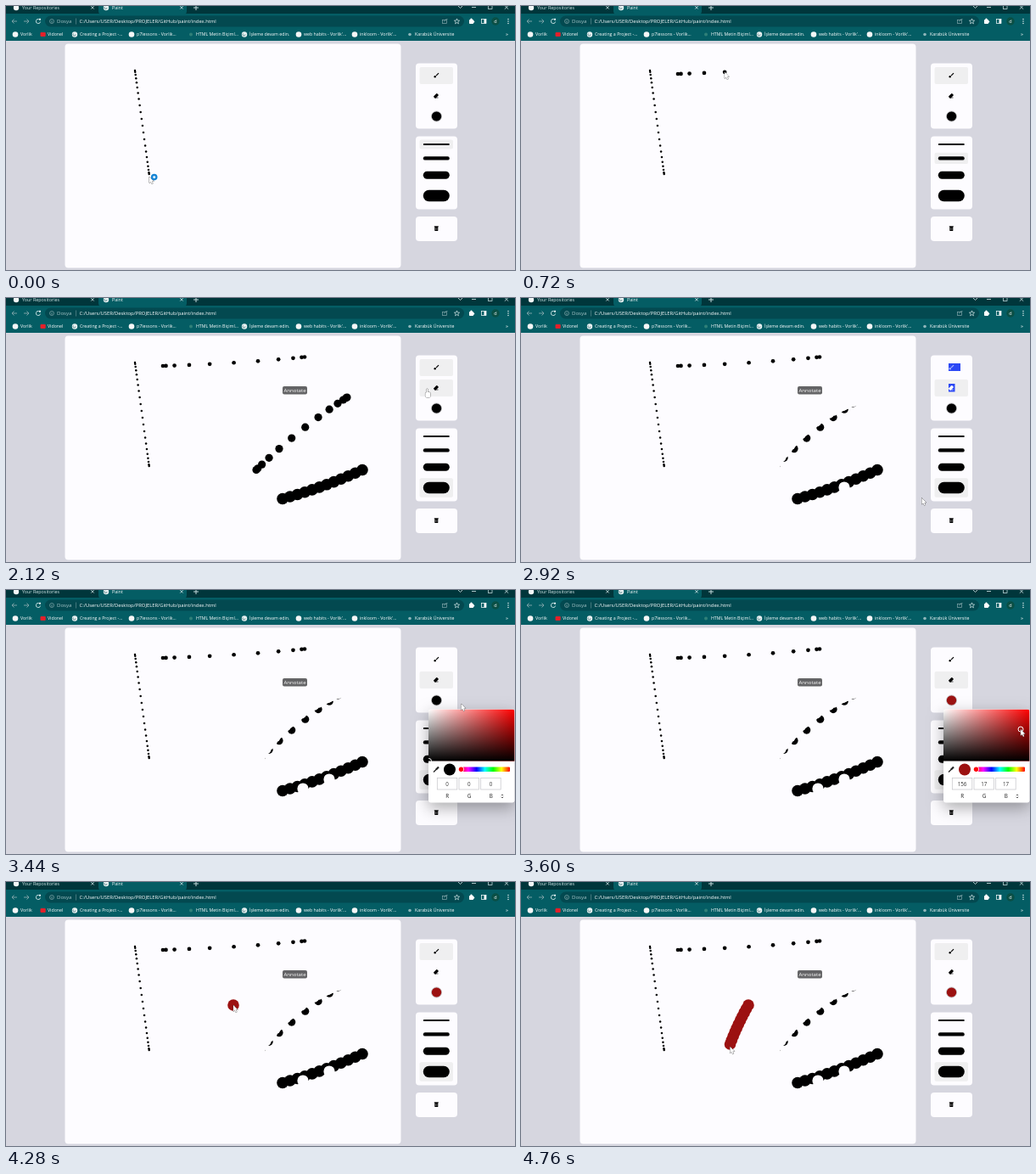
Recreate the animation shown at these times as an HTML page with a canvas. Size 600 px wide and 311 px high, loop 4800 ms.

```html
<!DOCTYPE html>
<html lang="tr">
<head>
<meta charset="utf-8">
<title>Paint</title>
<style>
html, body { margin: 0; width: 100%; height: 100%; overflow: hidden; background: #d6d6df; }
canvas { display: block; width: 100vw; height: 100vh; }
</style>
</head>
<body>
<canvas id="stage" width="600" height="311"></canvas>
<script>
const ctx = document.getElementById('stage').getContext('2d');
const LOOP = 4800, STEP = 40;
const PAPER = '#fdfcff', HOVER = '#efeff0', PALE = '#d9eaeb', DIM = '#86a9ad', RED = '#9c1111';
const FONT = '"Open Sans", "Noto Sans", sans-serif';

// ---------- drawing helpers ----------
function box(x, y, w, h, color, r = 0) {
  ctx.fillStyle = color;
  ctx.beginPath();
  ctx.roundRect(x, y, w, h, r);
  ctx.fill();
}
function frame(x, y, w, h, color, width = 0.7) {
  ctx.strokeStyle = color;
  ctx.lineWidth = width;
  ctx.strokeRect(x, y, w, h);
}
function disc(x, y, r, color) {
  ctx.fillStyle = color;
  ctx.beginPath();
  ctx.arc(x, y, r, 0, Math.PI * 2);
  ctx.fill();
}
function ring(x, y, r, color, width = 1, from = 0, to = Math.PI * 2) {
  ctx.strokeStyle = color;
  ctx.lineWidth = width;
  ctx.beginPath();
  ctx.arc(x, y, r, from, to);
  ctx.stroke();
}
function line(color, width, ...p) {
  ctx.strokeStyle = color;
  ctx.lineWidth = width;
  ctx.beginPath();
  for (let i = 0; i < p.length; i += 2) ctx.lineTo(p[i], p[i + 1]);
  ctx.stroke();
}
function label(str, x, y, size, color, align = 'left') {
  ctx.font = `${size}px ${FONT}`;
  ctx.textAlign = align;
  ctx.fillStyle = color;
  ctx.fillText(str, x, y);
}
// Open angle with its tip at (x, y), pointing along the given angle.
function chevron(x, y, angle, size, color, width = 0.8) {
  ctx.save();
  ctx.translate(x, y);
  ctx.rotate(angle);
  line(color, width, -size, -size, 0, 0, -size, size);
  ctx.restore();
}
function cross(x, y, r) {
  line(PALE, 0.8, x - r, y - r, x + r, y + r);
  line(PALE, 0.8, x + r, y - r, x - r, y + r);
}
function globe(x, y) {
  disc(x, y, 3.2, '#e8f1f2');
  ring(x - 0.5, y, 1.5, '#3f7278', 0.8, 0, 4);
}

// ---------- layout ----------
const BUTTON = { x: 487.5, w: 39.5 };
const rows = { brush: { top: 72, h: 20 }, eraser: { top: 96, h: 20 } };
const pens = { s1: 2, s2: 4.4, s3: 9, s4: 13.4 };
let nextTop = 157.6;
for (const [name, thick] of Object.entries(pens)) {
  rows[name] = { top: nextTop, h: thick + 9 };
  nextTop += thick + 13.1;
}
const middle = name => rows[name].top + rows[name].h / 2;
const rowAt = (x, y) => Object.keys(rows).find(name =>
  x > BUTTON.x && x < BUTTON.x + BUTTON.w && y > rows[name].top && y < rows[name].top + rows[name].h);

// ---------- strokes: a bowed line, sampled at the speed of the hand ----------
const mix = (a, b, k) => a + (b - a) * k;
const sCurve = (k, p) => k ** p / (k ** p + (1 - k) ** p);

function stroke({ start, end, a, b = a, r, n = 1, pace = 1, lag = 1, bow = 0, color = '#000' }) {
  const dx = b[0] - a[0], dy = b[1] - a[1], len = Math.hypot(dx, dy) || 1;
  return Array.from({ length: n }, (_, i) => {
    const k = n > 1 ? i / (n - 1) : 0;
    const s = sCurve(k ** lag, pace), off = bow * 4 * s * (1 - s) / len;
    return { t: mix(start, end, k), x: a[0] + dx * s - dy * off, y: a[1] + dy * s + dx * off, r, color };
  });
}
const tap = (t, x, y) => stroke({ start: t, end: t, a: [x, y], r: 6.6, color: PAPER });

const dots = [
  stroke({ start: -200, end: -40, a: [152, 76], b: [168.7, 198], r: 1.25, n: 22, pace: 1.4 }),
  stroke({ start: 640, end: 840, a: [185, 80], b: [352, 69.5], r: 2.35, n: 11, pace: 1.75, bow: 1.5 }),
  stroke({ start: 1240, end: 1400, a: [402, 117], b: [295, 202.5], r: 4.6, n: 13, pace: 1.75, lag: 1.1, bow: 3.3 }),
  stroke({ start: 1840, end: 2020, a: [420, 202.5], b: [326, 236.5], r: 6.8, n: 12, bow: -2 }),
  stroke({ start: 2320, end: 2600, a: [402, 117], b: [295, 202.5], r: 7.4, n: 24, bow: 13, color: PAPER }),
  tap(2840, 381, 223),
  tap(3040, 350, 234),
  stroke({ start: 4280, end: 4500, a: [268, 145], b: [246.5, 191], r: 6.8, n: 11, bow: 1, color: RED }),
].flat();

// ---------- pointer ----------
const clicks = [
  { t: 440, size: 's2' }, { t: 1120, size: 's3' }, { t: 1680, size: 's4' },
  { t: 2160, tool: 'eraser' }, { t: 4080, tool: 'brush' },
];
const latest = (t, kind, first) => clicks.reduce((v, c) => (c[kind] && c.t <= t ? c[kind] : v), first);

const PICK = { open: 3280, choose: 3520, close: 3680, x: 589, y: 164 };
const stay = (from, to, x, y) => [{ t: from, x, y }, { t: to, x, y }];
const path = [
  stay(0, 160, 169, 201),
  clicks.map(c => stay(c.t - 60, c.t + 60, 496, middle(c.tool || c.size) + 1)),
  stay(2920, 2920, 472.5, 235.5),
  stay(3200, 3340, 507, 129),
  stay(3440, 3440, 536.5, 134),
  stay(PICK.choose, 3640, PICK.x, PICK.y),
  stay(3760, 3840, 270, 110.5),
  stay(4560, LOOP, 246.5, 194),
  dots.filter(d => d.t > 0),
].flat(2).sort((p, q) => p.t - q.t);

function pointer(t) {
  const i = path.findIndex(p => p.t > t), p = path[i - 1], q = path[i];
  const e = sCurve((t - p.t) / (q.t - p.t), 1.7);
  return [mix(p.x, q.x, e), mix(p.y, q.y, e)];
}

function drawPointer(t, x, y) {
  ctx.save();
  ctx.translate(x, y);
  ctx.lineJoin = 'round';
  ctx.strokeStyle = '#444';
  ctx.lineWidth = 0.7;
  ctx.fillStyle = '#fff';
  ctx.beginPath();
  if (rowAt(x, y)) {
    ctx.roundRect(-0.4, 0, 1.8, 7, 0.9);
    ctx.roundRect(-1.6, 4, 6, 6, 1.6);
    ctx.stroke();
  } else {
    ctx.moveTo(0, 0);
    ctx.lineTo(0, 7.5);
    ctx.lineTo(1.7, 6);
    ctx.lineTo(3, 8.8);
    ctx.lineTo(4.1, 8.2);
    ctx.lineTo(3, 5.5);
    ctx.lineTo(5.2, 5.4);
    ctx.closePath();
    ctx.stroke();
  }
  ctx.fill();
  ctx.restore();
  if (t < 240) {
    disc(x + 5.7, y + 0.6, 3.8, '#1684d4');
    disc(x + 5.7, y + 0.6, 1.6, '#d9eefb');
  }
}

// ---------- browser ----------
const bookmarks = [
  ['dot', 17, 'Vorlik'], ['red', 49, 'Vidonel'], ['globe', 87, 'Creating a Project -...'],
  ['dot', 154, 'p7lessons - Vorlik...'], ['code', 224, 'HTML Metin Biçiml...'],
  ['globe', 287, 'İşleme devam edin.'], ['dot', 351, "web habits - Vorlik'..."],
  ['dot', 417, "inkloom - Vorlik'..."], ['small', 482, 'Karabük Üniversite'],
];
const bookmarkIcon = {
  dot: x => disc(x, 33.5, 3.3, '#f4f6f6'),
  red: x => box(x - 2.5, 31, 6.2, 5, '#e3202a', 1),
  globe: x => globe(x, 33.5),
  code: x => disc(x, 33.5, 2, '#2f8078'),
  small: x => disc(x, 33.5, 1.8, '#8fb6ba'),
};

function drawTabs() {
  box(0, 0, 600, 10, '#00363b');
  box(0, 9, 600, 32, '#045d64');
  box(109, -6, 104, 16, '#045d64', 4);
  disc(12, 2, 3.2, '#f4f8f8');
  label('Your Repositories', 19, 3.5, 5.4, PALE);
  cross(102, 1.8, 1.7);
  globe(118, 2);
  label('Paint', 125, 3.5, 5.4, '#fff');
  cross(207, 1.8, 1.7);
  line(PALE, 0.9, 221, 2, 227, 2);
  line(PALE, 0.9, 224, -1, 224, 5);
  chevron(535.5, 2.5, Math.PI / 2, 2.5, PALE);
  line(PALE, 0.8, 549, 1.5, 554, 1.5);
  frame(568.5, -1, 4.5, 4.5, PALE);
  cross(590, 1.5, 2.2);
}

function drawToolbar() {
  for (const [x, d] of [[10, -1], [24, 1]]) {
    line(DIM, 0.9, x - 3, 18, x + 3, 18);
    chevron(x + d * 3, 18, d > 0 ? 0 : Math.PI, 2.5, DIM, 0.9);
  }
  ring(38, 18, 2.6, PALE, 0.9, 0.2, 5.4);
  box(39, 14.8, 2, 2, PALE);

  box(46, 11.5, 494, 13, '#034950', 6.5);
  ring(54, 18, 2.5, DIM, 0.7);
  line(DIM, 0.8, 54, 17.3, 54, 19.5);
  label('Dosya', 60, 20.1, 6.1, '#a9c6c9');
  line('#70979b', 0.6, 82.5, 14.5, 82.5, 21.5);
  label('C:/Users/USER/Desktop/PROJELER/GitHub/paint/index.html', 86.5, 20.1, 5.85, '#fff');

  frame(514.5, 16.5, 5, 4, DIM);
  line(DIM, 0.7, 516.5, 18.5, 518, 16, 520.5, 15.5);
  ctx.strokeStyle = PALE;
  ctx.beginPath();
  for (let i = 0; i < 10; i++) {
    const a = i * Math.PI / 5 - Math.PI / 2, r = i % 2 ? 1.4 : 3.3;
    ctx.lineTo(531.5 + r * Math.cos(a), 18.2 + r * Math.sin(a));
  }
  ctx.closePath();
  ctx.stroke();
  box(546, 16, 5, 5, '#fff', 0.8);
  disc(548.5, 15.8, 1.2, '#fff');
  disc(551, 18.5, 1.2, '#fff');
  frame(560.5, 15.5, 5.5, 5, '#fff');
  box(563.5, 15.5, 2.5, 5, '#fff');
  disc(577, 18, 4.7, '#0a4f45');
  label('d', 577, 20, 5.5, '#fff', 'center');
  for (let i = -1; i <= 1; i++) disc(592, 18 + 2.5 * i, 0.7, '#fff');
}

function drawBookmarks() {
  for (const [kind, x, text] of bookmarks) {
    bookmarkIcon[kind](x - 6);
    label(text, x, 35.4, 5.25, '#fff');
  }
  label('»', 589, 35.3, 6, '#fff');
}

// ---------- tool panels ----------
function brushIcon(color) {
  line(color, 1.2, 510, 79.2, 507, 82.2);
  disc(505.7, 83.2, 1.2, color);
}
function eraserIcon(color) {
  ctx.save();
  ctx.translate(507, 105.8);
  ctx.rotate(-Math.PI / 4);
  box(-3, -1.7, 5.8, 3.4, color, 0.8);
  ctx.restore();
  line(color, 0.7, 505.5, 108, 509.5, 108);
}

function drawPanels(t, x, y, color) {
  for (const [top, h] of [[67.5, 77], [153.5, 86], [248, 29]]) box(483, top, 49, h, PAPER, 4);

  const lit = [latest(t, 'tool', 'brush'), latest(t, 'size', 's1'), rowAt(x, y)];
  for (const name of lit)
    if (name) box(BUTTON.x, rows[name].top, BUTTON.w, rows[name].h, HOVER, 2);

  const selected = t >= 2560 && t < 3000;
  if (selected) {
    box(504, 77, 14, 9, '#2c48f5');
    box(504, 101, 7.5, 9.5, '#2c48f5');
  }
  brushIcon(selected ? '#a9b6ff' : '#000');
  eraserIcon(selected ? '#fff' : '#000');

  disc(507.5, 130, 5.8, color);
  ring(507.5, 130, 6.1, '#9a9a9e', 0.5);
  for (const [name, thick] of Object.entries(pens))
    box(491.8, middle(name) - thick / 2, 31, thick, '#000', thick / 2);

  box(505.3, 260, 4, 5, '#000', 0.6);
  box(504.8, 259.3, 5, 1, '#000');
  for (const lx of [506.6, 508]) line('#aaa', 0.5, lx, 261.2, lx, 264);
}

// ---------- colour picker ----------
function blend(x0, y0, x1, y1, stops) {
  const g = ctx.createLinearGradient(x0, y0, x1, y1);
  stops.forEach((c, i) => g.addColorStop(i / (stops.length - 1), c));
  return g;
}

function drawPicker(picked, color) {
  const left = 498, top = 140.5, w = 101.5, h = 61;
  ctx.save();
  ctx.shadowColor = 'rgba(0,0,0,.32)';
  ctx.shadowBlur = 18;
  ctx.shadowOffsetY = 6;
  box(left, top, w, 110, '#fff', 3);
  ctx.restore();

  ctx.save();
  ctx.beginPath();
  ctx.rect(left, top, w, h + 3);
  ctx.clip();
  box(left, top, w, h, blend(left, 0, left + w, 0, ['#fff', '#f00']), [3, 3, 0, 0]);
  box(left, top, w, h, blend(0, top, 0, top + h, ['rgba(0,0,0,0)', '#000']), [3, 3, 0, 0]);
  ring(picked ? PICK.x : left + 0.5, picked ? PICK.y : top + h, 3, '#fff');
  ctx.restore();

  line('#222', 1.2, 504, 214.5, 507.5, 211);
  line('#222', 2.2, 507, 211.5, 510, 208.5);
  disc(523, 211.5, 7, color);
  const hues = Array.from({ length: 7 }, (_, i) => `hsl(${360 - 60 * i} 100% 50%)`);
  box(535, 208.5, 59, 5.5, blend(535, 0, 594, 0, hues), 1);
  disc(536.5, 211.2, 3.4, '#fff');
  disc(536.5, 211.2, 2.7, '#f00');

  (picked ? [156, 17, 17] : [0, 0, 0]).forEach((value, i) => {
    const x = 508.3 + 25.7 * i;
    frame(x, 221.5, 23.5, 13.5, '#c4c4c8');
    label(value, x + 11.8, 230.6, 6.2, '#333', 'center');
    label('RGB'[i], x + 12, 245, 6.3, '#222', 'center');
  });
  chevron(585, 240.9, -Math.PI / 2, 1.2, '#333');
  chevron(585, 245, Math.PI / 2, 1.2, '#333');
}

function render(t) {
  const [x, y] = pointer(t);
  const picked = t >= PICK.choose, color = picked ? RED : '#000';
  box(0, 0, 600, 311, '#d6d6df');
  drawTabs();
  drawToolbar();
  drawBookmarks();
  box(69.5, 44.5, 396, 264, PAPER, 4);
  for (const d of dots) if (d.t <= t) disc(d.x, d.y, d.r, d.color);
  drawPanels(t, x, y, color);
  if (t >= 920) {
    box(326, 104, 29, 9.5, '#646466', 2);
    label('Annotate', 340.5, 111, 6.1, '#fff', 'center');
  }
  if (t >= PICK.open && t < PICK.close) drawPicker(picked, color);
  drawPointer(t, x, y);
}

const begin = performance.now();
function tick() {
  const t = (performance.now() - begin) % LOOP;
  render(Math.floor(t / STEP) * STEP);
  requestAnimationFrame(tick);
}
tick();
</script>
</body>
</html>
```
